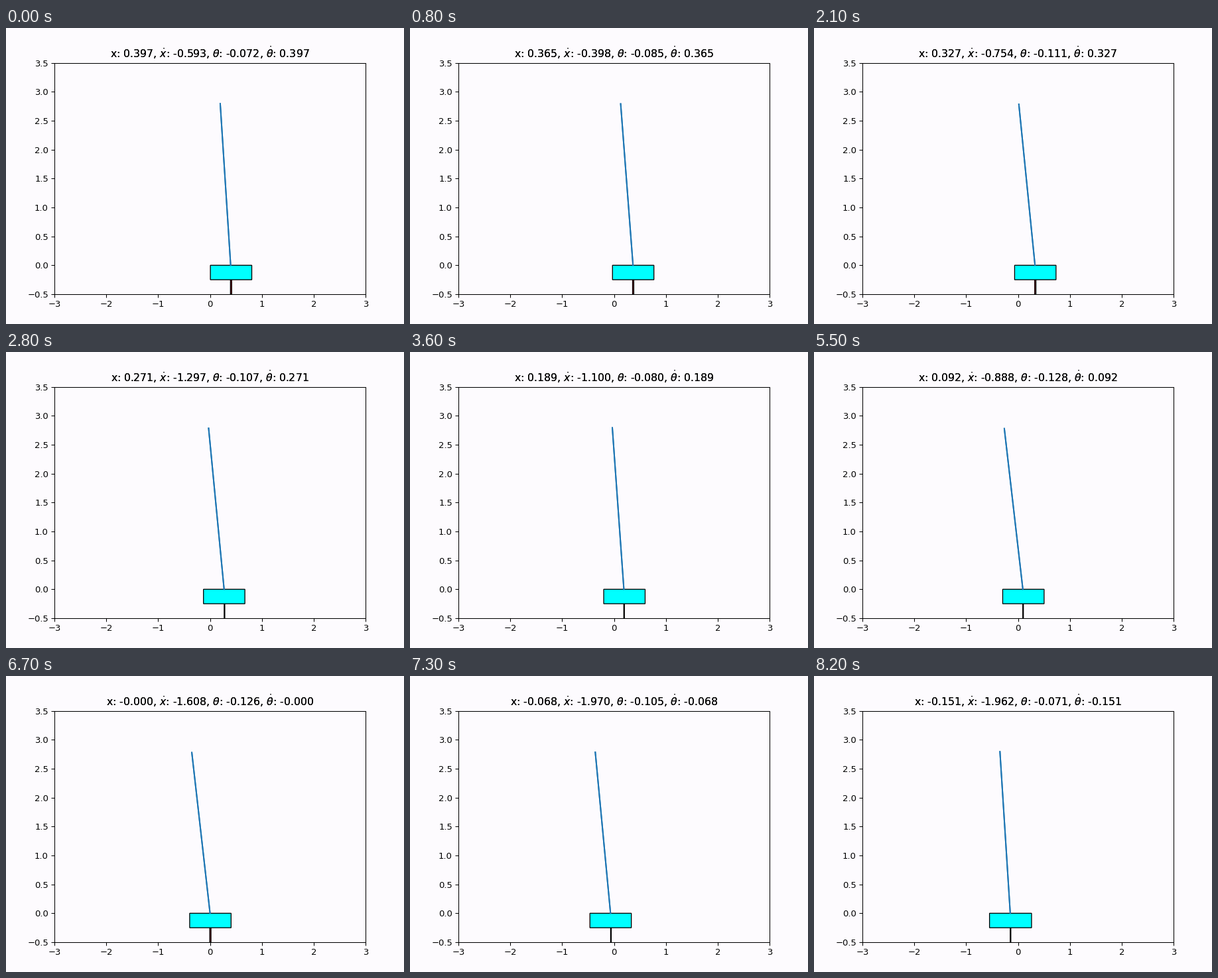
A matplotlib script for the animation above (8300 ms loop, 600x447 px).

```python
import math
import matplotlib.pyplot as plt
from matplotlib.animation import FuncAnimation
from matplotlib.patches import Rectangle

W, H, DPI = 600, 447, 100
SCALE = 0.9456          # drawing scale relative to a 640 x 480 figure
FRAMES, INTERVAL = 83, 100
STEP_FRAMES = 2.75      # video frames per simulation step
BG = "#fdfbfe"

# Cart-pole physics
G, M_POLE, M_ALL = 9.8, 0.3, 1.3
HALF, FORCE, TAU = 0.7, 10.0, 0.02
POLE = 4 * HALF
ACTIONS = "RLR" "LRLL" "LLLLRR" "RRRRLLL" "LLLL" "LLLR"


def simulate():
    x, v, th, om = 0.3972, -0.5934, -0.072, -0.1363
    states = [(x, v, th)]
    ml = M_POLE * HALF
    for act in ACTIONS:
        f = FORCE if act == "R" else -FORCE
        s, c = math.sin(th), math.cos(th)
        temp = (f + ml * om * om * s) / M_ALL
        th_acc = (G * s - c * temp) / (HALF * (4 / 3 - M_POLE * c * c / M_ALL))
        x_acc = temp - ml * th_acc * c / M_ALL
        x, v = x + TAU * v, v + TAU * x_acc
        th, om = th + TAU * om, om + TAU * th_acc
        states.append((x, v, th))
    return states


def snap(x):
    """Round a data x to the pixel grid of the 640 px wide figure."""
    px = 80 + 496 * (x + 3) / 6
    return (math.floor(px + 0.5) + 0.5 - 80) * 6 / 496 - 3


def span(rect, x, half):
    left, right = snap(x - half), snap(x + half)
    rect.set_x(left)
    rect.set_width(right - left)


plt.rcParams.update({
    "font.family": "DejaVu Sans",
    "font.size": 10 * SCALE,
    "axes.linewidth": 0.8 * SCALE,
    "axes.titlepad": 6 * SCALE,
})
for axis in ("xtick", "ytick"):
    plt.rcParams[axis + ".major.size"] = 3.5 * SCALE
    plt.rcParams[axis + ".major.width"] = 0.8 * SCALE
    plt.rcParams[axis + ".major.pad"] = 3.5 * SCALE

STATES = simulate()

fig = plt.figure(figsize=(W / DPI, H / DPI), dpi=DPI, facecolor=BG)
ax = fig.add_axes([73.13 / W, 45 / H, 496 * SCALE / W, 369.6 * SCALE / H],
                  facecolor=BG)
ax.set_xlim(-3, 3)
ax.set_ylim(-0.5, 3.5)

edge = dict(ec="black", lw=SCALE, snap=False)
post = ax.add_patch(Rectangle((0, -0.5), 0.02, 0.25, fc="#a00010", **edge))
cart = ax.add_patch(Rectangle((0, -0.25), 0.8, 0.25, fc="cyan", **edge))

# Pole and title are painted twice, which firms up their soft edges
poles = [ax.plot([], [], color="tab:blue", lw=1.5 * SCALE)[0]
         for _ in range(2)]
titles = [ax.set_title("")]
titles.append(ax.text(0.5, 1, "", ha="center", va="baseline", size="large",
                      transform=ax.title.get_transform()))


def draw(n):
    k = min(len(STATES) - 1, int((n + 0.3) / STEP_FRAMES))
    x, v, th = STATES[k]
    span(post, x, 0.01)
    span(cart, x, 0.4)
    for pole in poles:
        pole.set_data([x, x + POLE * math.sin(th)], [0, POLE * math.cos(th)])
    for title in titles:
        title.set_text(rf"x: {x:.3f}, $\dot{{x}}$: {v:.3f}, "
                       rf"$\theta$: {th:.3f}, $\dot{{\theta}}$: {x:.3f}")
    return post, cart, *poles, *titles


anim = FuncAnimation(fig, draw, frames=FRAMES, interval=INTERVAL,
                     repeat=True, repeat_delay=0, blit=False)
plt.show()
```
